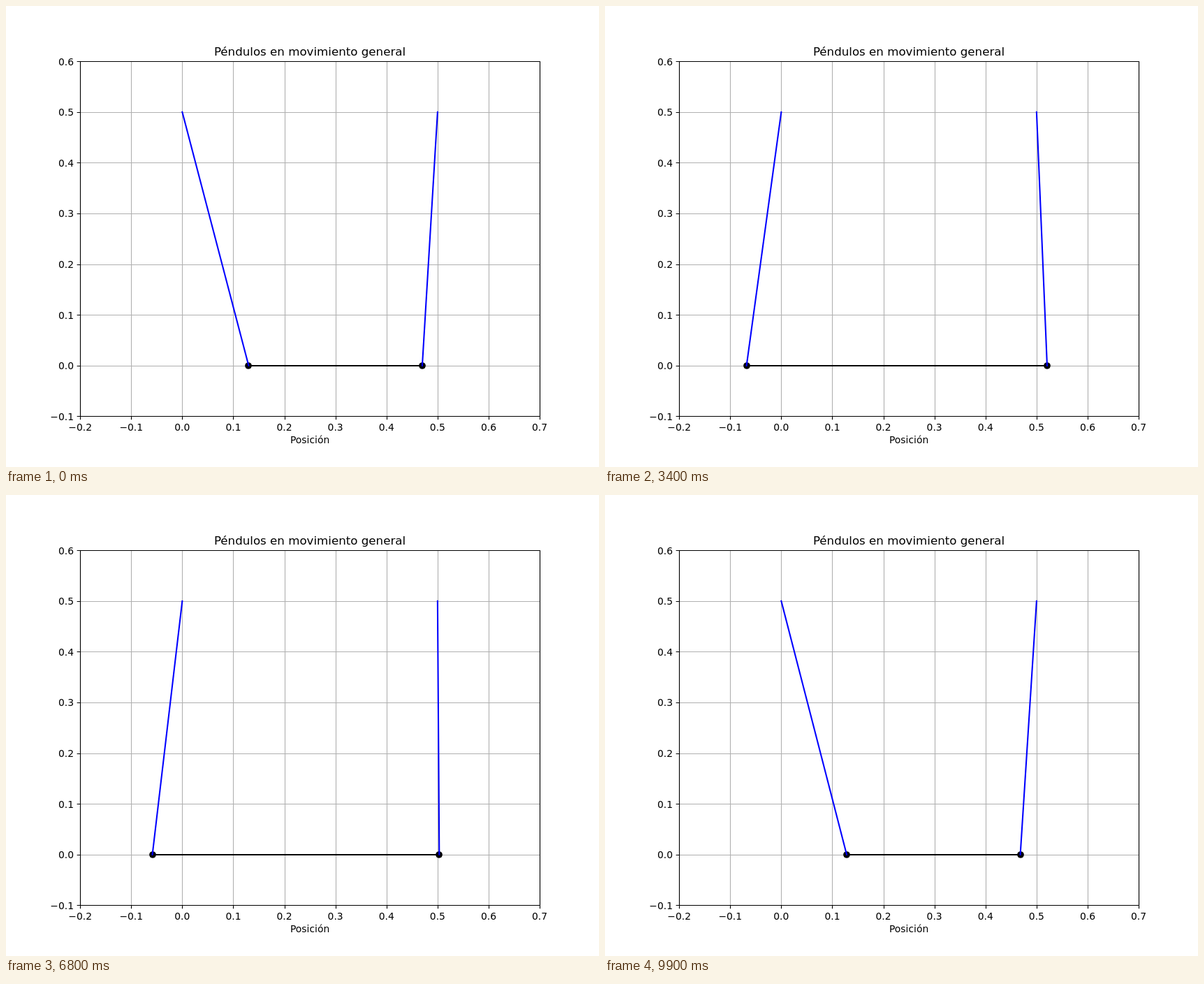
Animation, 849 px wide and 660 px high, one loop 10000 ms. Source, as an HTML page:

```html
<!DOCTYPE html>
<html lang="es">
<head>
<meta charset="utf-8">
<title>Péndulos</title>
<style>
  html, body { margin: 0; width: 100%; height: 100%; overflow: hidden; background: #fff; }
  svg { display: block; }
  text { font: 13.89px "DejaVu Sans", sans-serif; text-anchor: middle; }
  .title { font-size: 16.67px; }
  .left { text-anchor: end; }
  path { fill: none; stroke: #000; stroke-width: 1.11; }
  .grid { stroke: #b0b0b0; }
  .frame { stroke-linecap: square; }
  .bar, .rod { stroke-width: 2.08; stroke-linecap: square; }
  .rod { stroke: #00f; }
</style>
</head>
<body>
<svg width="849" height="660" viewBox="0 0 849 660">
  <path class="grid" id="grid"/>
  <path id="ticks"/>
  <path class="bar" id="bar"/>
  <circle class="bob" r="4.86" cy="515"/>
  <circle class="bob" r="4.86" cy="515"/>
  <path class="rod" id="rods"/>
  <path class="frame" d="M106.5 79.5H764.5V587.5H106.5Z"/>
  <text class="title" x="435" y="71">Péndulos en movimiento general</text>
  <text x="435.1" y="626">Posición</text>
  <g id="labels"></g>
</svg>
<script>
const $ = id => document.getElementById(id);
const bobs = document.querySelectorAll('.bob');

// Data coordinates to stage pixels
const px = x => 252.34 + x * 731.08;
const py = y => 514.8 - y * 726;
const snap = v => Math.round(v) + 0.5;

function label(value, x, y, cls = '') {
  const el = document.createElementNS('http://www.w3.org/2000/svg', 'text');
  el.setAttribute('x', x);
  el.setAttribute('y', y);
  el.setAttribute('class', cls);
  el.textContent = (value / 10).toFixed(1).replace('-', '−');
  $('labels').append(el);
}

function drawAxes() {
  let grid = '', ticks = '';
  for (let i = -2; i <= 7; i++) {
    const x = px(i / 10);
    grid += `M${snap(x)} 79.5V587.5`;
    ticks += `M${snap(x)} 587.5v4.86`;
    label(i, x, 608);
  }
  for (let i = -1; i <= 6; i++) {
    const y = py(i / 10);
    grid += `M106.5 ${snap(y)}H764.5`;
    ticks += `M106.5 ${snap(y)}h-4.86`;
    label(i, 97, Math.round(y + 5.4), 'left');
  }
  $('grid').setAttribute('d', grid);
  $('ticks').setAttribute('d', ticks);
}

// Two normal modes: swinging together and in opposition
function draw(now) {
  const t = Math.floor(now / 100) % 100 * 10 / 99;
  const together = 0.05 * Math.cos(0.601 * t);
  const opposed = 0.08 * Math.cos(0.2 * Math.PI * t);
  const a = px(together + opposed);
  const b = px(0.5 + together - opposed);
  $('rods').setAttribute('d',
    `M${px(0)} ${py(0.5)}L${a} ${py(0)}M${px(0.5)} ${py(0.5)}L${b} ${py(0)}`);
  $('bar').setAttribute('d', `M${a} 515H${b}`);
  [a, b].forEach((x, i) => bobs[i].setAttribute('cx', Math.round(x)));
}

function loop() {
  draw(performance.now());
  requestAnimationFrame(loop);
}

drawAxes();
loop();
</script>
</body>
</html>
```
